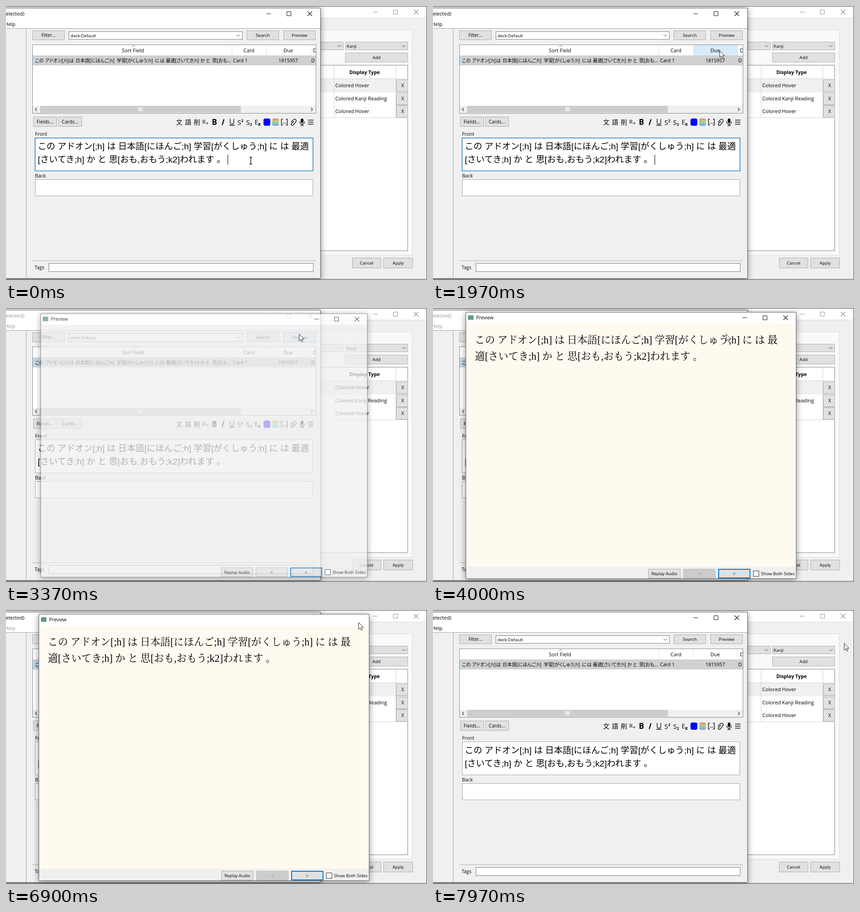
These frames come from a looping animation (927 px wide and 604 px high, 8000 ms). An HTML page:

```html
<!DOCTYPE html>
<html lang="ja">
<head>
<meta charset="utf-8">
<title>Card browser preview</title>
<style>
  html, body { margin: 0; width: 100%; height: 100%; overflow: hidden; background: #f0f0f0; }
  svg { display: block; width: 927px; height: 604px; font-family: "Open Sans", "Noto Sans CJK JP", sans-serif; }
  text { white-space: pre; }
  .mid { text-anchor: middle; }
  .row { font-feature-settings: "palt"; }
  .field { font: 300 19.2px "Liberation Sans", "Noto Sans CJK JP", sans-serif; }
  .card { font: 300 22.2px "Liberation Serif", "Noto Serif CJK JP", "Noto Sans CJK JP", serif; }
  .shadow { filter: drop-shadow(0 2px 7px rgba(0, 0, 0, .45)); }
  #preview { transform-origin: 436px 303px; }
</style>
</head>
<body>
<svg id="stage" viewBox="0 0 927 604" xmlns="http://www.w3.org/2000/svg"></svg>
<script>
const LOOP = 8000;
const BUTTON = '#e1e1e1', EDGE = '#adadad', FACE = '#f0f0f0', BLUE = '#0078d7';

const fill = (x, y, w, h, color, attrs = '') =>
  `<rect x="${x}" y="${y}" width="${w}" height="${h}" fill="${color}" ${attrs}/>`;
const box = (x, y, w, h, color, edge, attrs = '') =>
  fill(x + .5, y + .5, w - 1, h - 1, color, `stroke="${edge}" ${attrs}`);
const text = (x, y, s, size = 9.6, attrs = '') =>
  `<text x="${x}" y="${y}" font-size="${size}" ${attrs}>${s.replace(/</g, '&lt;')}</text>`;
const label = (x, y, s, size, attrs = '') => text(x, y, s, size, `class="mid" ${attrs}`);
const line = (d, color = '#222', width = 1, attrs = '') =>
  `<path d="${d}" fill="none" stroke="${color}" stroke-width="${width}" ${attrs}/>`;
const button = (x, y, w, h, s, size = 9.6, attrs = '') =>
  box(x, y, w, h, BUTTON, EDGE, attrs) + label(x + w / 2, y + h / 2 + 3.5, s, size);
const chevron = (x, y) => line(`M${x - 4} ${y - 2}l4 4 4-4`, '#444');
const controls = (minX, maxX, closeX, y, color) =>
  line(`M${minX - 5} ${y}h10M${maxX - 4.5} ${y - 4.5}h9v9h-9z`, color) +
  line(`M${closeX - 5} ${y - 5}l10 10m0-10l-10 10`, color, 1.1);

function optionsWindow() {
  const rows = ['Colored Hover', 'Colored Kanji Reading', 'Colored Hover'].map((name, i) => {
    const y = 161 + i * 28.5;
    return fill(690, y, 168, 28, i ? '#fff' : FACE) + text(725, y + 18, name, 11.15) +
      line(`M690 ${Math.round(y + 28) + .5}h195`, '#d4d4d4') +
      box(859, Math.round(y) + 1, 26, 27, BUTTON, EDGE) + label(873.5, y + 18, 'X', 10.2);
  }).join('');
  return fill(0, 0, 927, 604, FACE) + fill(0, 1, 927, 25, '#fff') +
    line('M0 26.5H926', '#d9d9d9') + controls(813, 857.5, 903, 13.5, '#8d8d8d') +
    box(600, 52, 295, 498, '#f9f9f9', '#dcdcdc') +
    box(600, 79, 143, 18, BUTTON, EDGE) + chevron(734, 88) +
    box(747, 79, 138, 18, BUTTON, EDGE) + text(750, 91.5, 'Kanji') + chevron(876, 88) +
    button(747, 103, 138, 21, 'Add') +
    box(600, 130, 285, 410, '#fff', '#828790') +
    label(789.5, 150, 'Display Type', 10.7, 'font-weight="700"') +
    line('M690 160.5H885', '#d4d4d4') + rows +
    line('M722.5 131V246M858.5 131V246', '#d4d4d4') +
    button(762, 555, 64, 23, 'Cancel', 9.5) + button(831, 555, 65, 23, 'Apply', 9.4) +
    line('M0 .5H926.5V602.5H0', '#3c3c3c');
}

function toolbar() {
  const bold = 'font-weight="700"';
  return label(381.5, 261, '文', 14) + label(401, 261, '語', 14) + label(420.5, 261, '削', 14) +
    text(432, 259, 'R', 12, 'font-family="Liberation Serif, serif"') + text(440, 262, '+', 11) +
    label(459, 262, 'B', 17, bold) + line('M480 249.5L476 262.5', '#111', 2.4) +
    line('M493.5 249v7.5q0 4 4 4t4-4V249M491.5 263h12', '#111', 1.4) +
    text(509.5, 262, 'S', 15) + text(518, 256, '2', 8, bold) +
    text(528.5, 262, 'S', 15) + text(537, 264, '2', 8, bold) +
    text(547.5, 261, 'E', 14) + text(555, 264, 'x', 10, bold) +
    fill(567, 248, 15, 16, '#0000ff', 'rx="4"') + fill(586, 248, 15, 16, 'url(#rainbow)', 'rx="4"') +
    line('M609.5 249.5h-3v13h3M616.5 249.5h3v13h-3', '#111', 1.4) +
    line('M609.5 258.5h8', '#111', 1.6, 'stroke-dasharray="1.6 1.4"') +
    line('M634 254l-5 5a2.4 2.4 0 0 0 3.5 3.5l5.5-7a3.4 3.4 0 0 0-5-5l-5.5 6', '#111', 1.5) +
    fill(649, 248, 6, 10, '#111', 'rx="3"') +
    line('M646.5 254.5q0 6 5.5 6t5.5-6M652 260v3.5M648.5 263.5h7', '#111', 1.3) +
    line('M665 251.5h12M665 256h12M665 260.5h12', '#111', 1.6);
}

function browserWindow() {
  const words = [[64, 'この'], [86, 'アドオン[;h]'], [139, 'は'], [153, '日本語[にほんご;h]'],
    [244, '学習[がくしゅう;h]'], [328, 'に'], [339, 'は'], [352, '最適[さいてき;h]'],
    [428, 'か'], [440, 'と'], [454, '思[おも...']];
  return fill(-30, 4, 723, 597, FACE, 'class="shadow"') +
    fill(-30, 4, 723, 45, '#fff') +
    text(-.5, 21, 'elected)', 11.1, 'id="title"') + text(-3, 44, 'Help', 10.9, 'id="menu"') +
    `<g id="mainControls">${controls(578.5, 623, 669, 17, 'currentColor')}</g>` +
    line('M0 49.5H692M44.5 50V600', '#a3a3a3') +
    button(58, 54, 71, 21, 'Filter...', 9.9) +
    box(138, 56, 383, 18, '#fff', '#7a7a7a') + text(142, 68.5, 'deck:Default') + chevron(511.5, 65) +
    button(530, 54, 71, 21, 'Search', 9.8) + button(611, 54, 71, 21, 'Preview', 9.6, 'id="previewButton"') +
    box(58, 85, 625, 152, '#fff', '#828790') +
    fill(573, 86, 97, 23, '#d9ebf9', 'id="dueHover"') +
    line('M497.5 86V109M573.5 86V109M670.5 86V109', '#dedede') +
    line('M277 90l3.5-3 3.5 3', '#777') +
    label(279.5, 101.5, 'Sort Field', 11.2) + label(535, 101.5, 'Card', 10.9) + label(621.5, 101.5, 'Due', 11) +
    fill(59, 109, 623, 22, '#d0d0d0') + fill(59, 109, 4, 22, '#c3d9e8', 'id="rowMark"') +
    words.map(([x, s]) => text(x, 124, s, 10.3, 'class="row"')).join('') +
    text(500, 124, 'Card 1', 10.6) + label(621.5, 124, '1815957', 10.75) +
    `<g clip-path="url(#list)">${text(676, 101.5, 'Deck', 11)}${text(672, 124, 'D', 11)}</g>` +
    fill(59, 220, 623, 16, FACE) + fill(75, 220, 442, 15, '#cdcdcd') + fill(291, 223, 10, 9, '#e9e9e9') +
    line('M68 224.5l-3.5 3.5 3.5 3.5M671.5 224.5l3.5 3.5-3.5 3.5', '#333', 1.3) +
    button(60, 244, 52, 22, 'Fields...', 10.6) + button(115, 244, 52, 22, 'Cards...', 10.5) + toolbar() +
    text(64, 286, 'Front', 10.8) +
    box(64, 290, 612, 74, '#fff', '#a6a6a6') +
    fill(64, 291, 612, 72.5, 'none', 'id="focus" stroke="#3b8cc4" stroke-width="1.6"') +
    text(70, 316, 'この アドオン[;h] は 日本語[にほんご;h] 学習[がくしゅう;h] に は 最適', 19.2, 'class="field"') +
    text(70, 345, '[さいてき;h] か と 思[おも,おもう;k2]われます 。', 19.2, 'class="field"') +
    fill(488, 328, 1, 22, '#000', 'id="caret"') +
    text(64, 377.5, 'Back', 10.8) + box(64, 382, 612, 37, '#fff', '#a6a6a6') +
    line('M58 561.5H682', '#b0b0b0') +
    text(63, 580, 'Tags', 10.4) + box(94, 567, 583, 19, '#fff', '#7a7a7a') +
    line('M0 4.5H692.5V600.5H0', '#5c5c5c');
}

function previewWindow() {
  return `<g id="preview">` + fill(72, 9, 728, 588, FACE, 'class="shadow"') +
    fill(72, 9, 728, 25, '#fff') + fill(77, 16, 12, 10, '#5f9a8a') + text(95, 25, 'Preview', 10.6) +
    fill(754, 10, 45, 24, '#e81123', 'id="closeHover"') +
    `<g id="previewControls" color="#111">${controls(686.5, 731, 776.5, 21.5, 'currentColor')}</g>` +
    fill(73, 34, 726, 536, '#fffaf0', 'id="page"') +
    `<g id="cardText">` +
    text(92, 78, 'この アドオン[;h] は 日本語[にほんご;h] 学習[がくしゅう;h] に は 最', 22.2, 'class="card"') +
    text(92, 113.5, '適[さいてき;h] か と 思[おも,おもう;k2]われます 。', 22.2, 'class="card"') + `</g>` +
    button(474, 575, 71, 21, 'Replay Audio', 9.4) +
    box(551, 575, 71, 21, BUTTON, EDGE, 'id="back"') + label(586.5, 589, '<', 9.6, 'id="backLabel"') +
    button(628, 575, 71, 21, '>') + fill(629, 576, 69, 19, 'none', `stroke="${BLUE}" stroke-width="2"`) +
    box(705, 579, 13, 13, '#fff', '#333') + text(722, 589, 'Show Both Sides', 9.6) +
    box(72, 9, 728, 588, 'none', '#6a6a6a') + `</g>`;
}

const stage = document.getElementById('stage');
stage.innerHTML = `<defs>
    <linearGradient id="rainbow" x2="0" y2="1">
      <stop stop-color="#f08080"/><stop offset=".35" stop-color="#c8c878"/>
      <stop offset=".6" stop-color="#78dca0"/><stop offset="1" stop-color="#9090f0"/>
    </linearGradient>
    <clipPath id="list"><rect x="59" y="86" width="623" height="150"/></clipPath>
  </defs>` + optionsWindow() + browserWindow() + previewWindow() +
  `<g id="beam">${line('M-3-7.5h2.2L0-6.8.8-7.5H3M0-7V7M-3 7.5h2.2L0 6.8.8 7.5H3', '#000', 1.3)}</g>
   <path id="arrow" d="M.5.5V15.6L4 12.3 6.4 17.8 8.7 16.8 6.3 11.4H11Z" fill="#fff" stroke="#222"/>`;

const $ = Object.fromEntries([...stage.querySelectorAll('[id]')].map(el => [el.id, el]));

// Each row: time, then values.
const pointer = [[0, 539, 341], [1330, 539, 341], [1480, 551, 308], [1700, 588, 212], [1970, 631, 98],
  [2130, 641, 74], [2330, 645, 57], [6030, 645, 57], [6200, 682, 46], [6400, 748, 27], [6570, 774, 22],
  [6830, 774, 22], [6900, 776, 27], [7070, 784, 30], [7350, 835, 49], [7630, 880, 66], [7970, 905, 73], [8000, 905, 73]];
// Opacity and scale.
const previewPose = [[0, 0, .93], [3290, 0, .93], [3370, .74, .989], [3500, 1, 1], [6905, 1, 1],
  [7060, 0, .93], [8000, 0, .93]];
const caretOn = [[0, 70], [600, 1100], [1630, 2170], [2730, 3030]];

function sample(track, t) {
  const i = Math.max(1, track.findIndex(key => key[0] > t));
  const a = track[i - 1], b = track[i], k = (t - a[0]) / (b[0] - a[0]);
  return a.slice(1).map((v, j) => v + (b[j + 1] - v) * k);
}
const show = (el, on) => el.setAttribute('visibility', on ? 'visible' : 'hidden');
const within = (t, a, b) => t >= a && t < b;

function render(t) {
  const [x, y] = sample(pointer, t);
  const [opacity, scale] = sample(previewPose, t);
  const overField = t < 3000 && within(y, 291, 363);
  show($.beam, overField);
  show($.arrow, !overField);
  for (const el of [$.beam, $.arrow]) el.setAttribute('transform', `translate(${Math.round(x)} ${Math.round(y)})`);

  show($.dueHover, t < 3000 && within(y, 86, 109));
  const hover = within(t, 2200, 7130);
  $.previewButton.setAttribute('fill', hover ? '#d9e7f1' : BUTTON);
  $.previewButton.setAttribute('stroke', hover ? '#5c8fb8' : EDGE);
  show($.caret, caretOn.some(([a, b]) => within(t, a, b)));
  show($.focus, t < 3030);

  const behind = within(t, 3290, 6930);
  $.rowMark.setAttribute('width', behind ? 17 : 4);
  $.title.setAttribute('fill', within(t, 3290, 6830) ? '#999' : '#000');
  $.menu.setAttribute('fill', behind ? '#999' : '#000');
  $.mainControls.setAttribute('color', behind ? '#999' : '#111');

  show($.preview, opacity > 0);
  $.preview.style.opacity = opacity;
  $.preview.style.transform = `scale(${scale})`;
  const closing = within(t, 6480, 6830);
  show($.closeHover, closing && opacity > 0);
  show($.previewControls, opacity > 0 && t < 6830);
  $.previewControls.lastChild.setAttribute('stroke', closing ? '#fff' : '#111');

  const loaded = t >= 3500;
  show($.page, opacity > 0 && loaded);
  show($.cardText, opacity > 0 && t >= 3970);
  $.back.setAttribute('fill', loaded ? '#ccc' : BUTTON);
  $.back.setAttribute('stroke', loaded ? '#bfbfbf' : EDGE);
  $.backLabel.setAttribute('fill', loaded ? '#777' : '#000');
}

const start = performance.now();
function tick() {
  render((performance.now() - start) % LOOP);
  requestAnimationFrame(tick);
}
tick();
</script>
</body>
</html>
```
